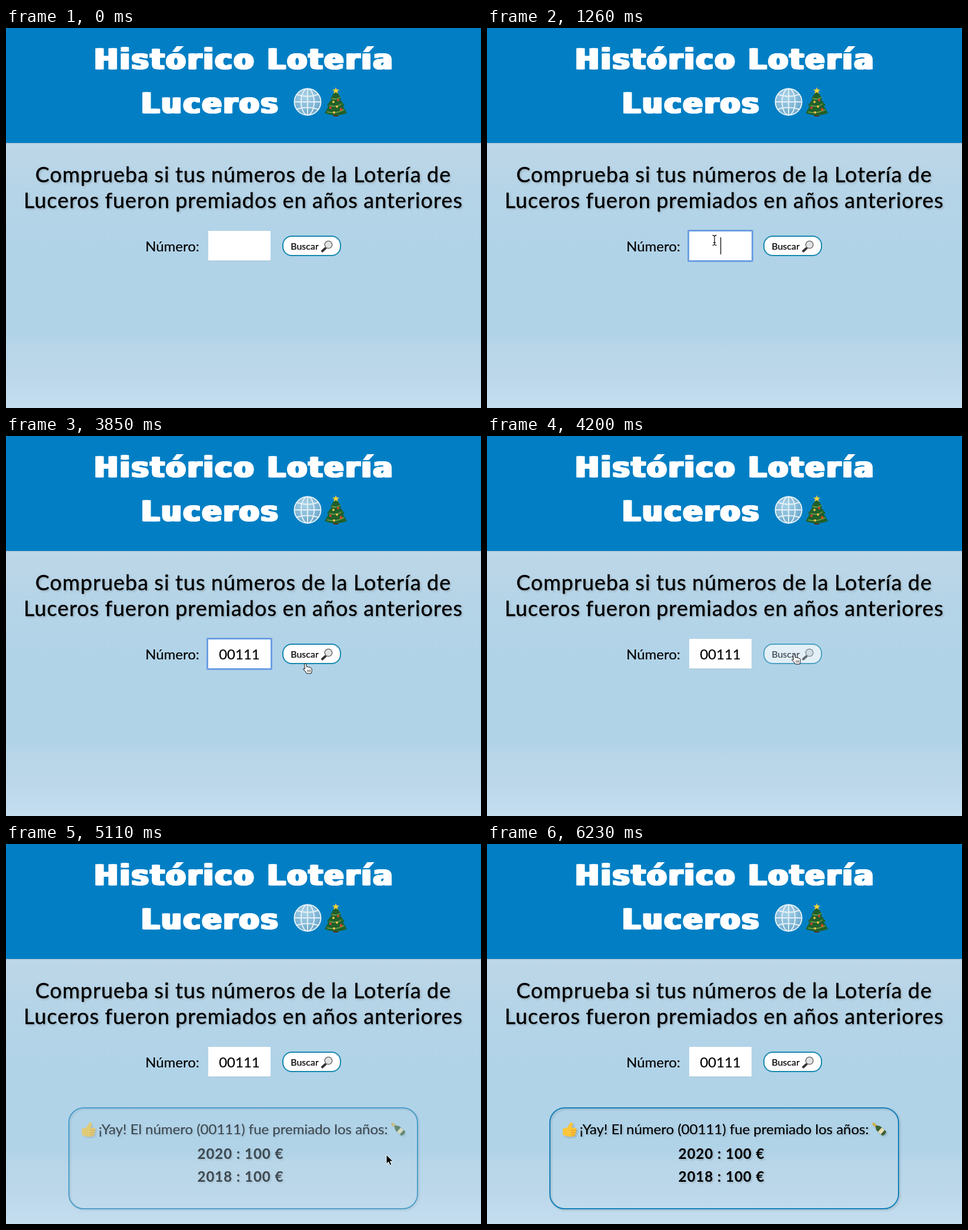
Recreate the animation shown at these times as an HTML page. Size 808 by 648 pixels, loop 6370 ms.

```html
<!DOCTYPE html>
<html lang="es">
<head>
<meta charset="utf-8">
<title>Histórico Lotería Luceros</title>
<style>
  html, body { margin: 0; width: 100%; height: 100%; overflow: hidden; }
  svg { display: block; width: 808px; height: 648px; }
  text { font: 24px Lato, sans-serif; text-anchor: middle; white-space: pre; stroke: #000; stroke-width: .2px; }
  .title text { font: bold 48px "DejaVu Sans", sans-serif; letter-spacing: 3.5px; fill: #fff; stroke: #fff; stroke-width: 1px; }
  .lead { font-size: 36px; letter-spacing: 1px; word-spacing: -.8px; stroke-width: .45px; }
  .prize { font-weight: bold; letter-spacing: 1px; }
  .shadow { filter: drop-shadow(2px 2px 1.5px rgba(0, 0, 0, .16)); }
</style>
</head>
<body>
<svg viewBox="0 0 808 648">
  <defs>
    <linearGradient id="sky" x2="0" y2="1">
      <stop offset="0" stop-color="#bdd7e7"/>
      <stop offset=".2" stop-color="#b5d4e7"/>
      <stop offset=".45" stop-color="#b0d3e8"/>
      <stop offset=".73" stop-color="#b1d3e8"/>
      <stop offset=".77" stop-color="#b8d6e8"/>
      <stop offset=".89" stop-color="#bcd8ea"/>
      <stop offset="1" stop-color="#c4def0"/>
    </linearGradient>
    <radialGradient id="ball" cx=".4" cy=".3" r=".75">
      <stop offset="0" stop-color="#a9d3e8"/>
      <stop offset="1" stop-color="#68a5cb"/>
    </radialGradient>
  </defs>

  <rect y="196" width="808" height="452" fill="url(#sky)"/>
  <rect y="196" width="808" height="1" fill="#a9bfcc"/>
  <rect width="808" height="196" fill="#027fc4"/>

  <g class="title">
    <g id="heading">
      <text x="405.500" y="70">Histórico Lotería</text>
      <text x="348" y="145">Luceros</text>
    </g>
    <use href="#heading" x="-2.200"/>
    <use href="#heading" x="2.200"/>
  </g>

  <g fill="none" stroke="#e4f0f6" stroke-width="2">
    <circle cx="513" cy="126" r="22.500" fill="url(#ball)"/>
    <ellipse cx="513" cy="126" rx="11" ry="22.500"/>
    <path d="M513 103v46M490 126h46M494 113q19 7 38 0M494 139q19-7 38 0"/>
  </g>

  <g>
    <path d="M557 139h8v12h-8z" fill="#5c321c"/>
    <path d="M561 106l9 14-2 1 8 11-3 1 7 12q-19 8-38 0l7-12-3-1 8-11-2-1z" fill="#20602b"/>
    <path d="M554 120q8 3 15-2M550 132q12 4 21-3M546 143q16 4 29-4" fill="none" stroke="#78a548" stroke-width="1.500"/>
    <path d="M561 101l1.500 4 4.500 0-3.500 3 1.500 4-4-2.500-4 2.500 1.500-4-3.500-3 4.500 0z" fill="#f8cf3e"/>
    <g fill="#d8442e">
      <circle cx="565" cy="123" r="2"/><circle cx="552" cy="136" r="2"/><circle cx="570" cy="139" r="2.300"/>
    </g>
    <g fill="#f0c14b">
      <circle cx="557" cy="126" r="2"/><circle cx="563" cy="134" r="2"/><circle cx="558" cy="144" r="2"/>
    </g>
  </g>

  <g class="shadow">
    <text class="lead" x="403.500" y="263">Comprueba si tus números de la Lotería de</text>
    <text class="lead" x="403.500" y="307">Luceros fueron premiados en años anteriores</text>
  </g>

  <text x="283" y="381">Número:</text>
  <rect x="344" y="346.500" width="106" height="51" fill="#a5bdcb"/>
  <rect x="344" y="346" width="106" height="50.500" fill="#fff"/>
  <rect id="ring" x="342.500" y="345.500" width="109" height="52" rx="1" fill="#fff" stroke="#6d9fe2" stroke-width="3"/>
  <text id="value" x="397" y="381"></text>
  <rect id="caret" y="357" width="1.200" height="29"/>

  <g id="button">
    <rect x="471" y="355" width="98" height="33" rx="15" fill="#fff" stroke="#1788b0" stroke-width="2"/>
    <text x="508" y="378" style="font-size:16px">Buscar</text>
    <path d="M538 380.500l5.500-5" stroke="#333" stroke-width="4" stroke-linecap="round"/>
    <circle cx="548.500" cy="369.500" r="6.300" fill="#dfe4e6" stroke="#77706c" stroke-width="1.600"/>
  </g>

  <g id="result" class="shadow">
    <rect x="107" y="450" width="593" height="172" rx="25" fill="none" stroke="#1580b8" stroke-width="2"/>
    <text x="403.500" y="495">¡Yay! El número (00111) fue premiado los años:</text>
    <text class="prize" x="399" y="537">2020 : 100 €</text>
    <text class="prize" x="399" y="576">2018 : 100 €</text>
    <path d="M129 485l7-1 6-9q4-1 4 3l-2 6h7q2 1 1 4l-2 8q-1 3-5 3h-8l-8-3z" fill="#fbc63b"/>
    <path d="M143 488h9M143 492h8M143 496h7" stroke="#d08f20"/>
    <g transform="translate(656 476) rotate(-48) scale(.8 .92)">
      <path d="M-2 1h4v8q4 3 4 7v13q-6 3-12 0V16q0-4 4-7z" fill="#3c6233"/>
      <path d="M-2.500 0h5v8h-5z" fill="#d3b24c"/>
      <path d="M-6 18H6v7H-6z" fill="#eadfb4"/>
    </g>
  </g>

  <g id="arrow" stroke="#fff" stroke-linejoin="round">
    <path d="M0 0v15.500l3.600-3.400 2.500 5.700 2.800-1.200-2.500-5.500h5z"/>
  </g>
  <g id="beam" fill="none" stroke="#222" stroke-width="1.300">
    <path d="M-3.500-8.500Q0-8.500 0-6 0-8.500 3.500-8.500M0-7V7M-3.500 8.500Q0 8.500 0 6 0 8.500 3.500 8.500M-2 4H2"/>
  </g>
  <g id="hand" fill="#fff" stroke="#111" stroke-linejoin="round">
    <path d="M-1.500 1Q0-1 1.500 1l1 5q2-1.500 3 .5 2-1 3 .8 2-.6 2.500 1.500 1 4-1 8.200H2.500Q0 12-3 10.500-4 8.500-2 8.500l1.500 1z"/>
    <path d="M4 10.500v4M6.200 10.500v4M8.400 10.500v4" stroke-width=".8"/>
  </g>
</svg>
<script>
const LOOP = 6370, STEP = 70;
const NUMBER = "00111", KEY_TIMES = [1470, 1680, 2380, 2660, 3010];
const DIGIT = 13.92;
const FOCUS = 910, HIDE = 2100, MOVE = 3500, CLICK = 4200;

// Pointer paths: [time, x, y]
const ARRIVE = [[70, 470, 655], [840, 387, 362], [HIDE, 387, 362]];
const LEAVE = [[MOVE, 387, 362], [3850, 509, 388], [4060, 522, 372], [4270, 522, 372],
  [4620, 612, 422], [5110, 647, 530], [5600, 690, 655]];

const el = id => document.getElementById(id);
const clamp = v => Math.min(1, Math.max(0, v));
const show = (id, on) => el(id).style.display = on ? "" : "none";
const inside = ([x, y], l, t, r, b) => x >= l && x <= r && y >= t && y <= b;

function along(path, t) {
  const i = path.findIndex(p => p[0] > t);
  if (i < 1) return null;
  const [a, b] = [path[i - 1], path[i]];
  const k = (t - a[0]) / (b[0] - a[0]);
  return [a[1] + (b[1] - a[1]) * k, a[2] + (b[2] - a[2]) * k];
}

function drawPointer(t) {
  const pos = along(t < HIDE ? ARRIVE : LEAVE, t);
  const kind = !pos ? "" :
    inside(pos, 344, 346, 450, 397) ? "beam" :
    inside(pos, 470, 354, 570, 389) ? "hand" : "arrow";
  for (const id of ["arrow", "beam", "hand"]) {
    show(id, id === kind);
    if (id === kind) el(id).setAttribute("transform", `translate(${pos})`);
  }
}

function draw(t) {
  const typed = KEY_TIMES.filter(k => t >= k).length;
  el("value").textContent = NUMBER.slice(0, typed);
  el("caret").setAttribute("x", 397 + typed * DIGIT / 2);
  show("caret", t >= FOCUS && t < MOVE && !(t >= HIDE && t < KEY_TIMES[2]));
  show("ring", t >= FOCUS && t < CLICK);
  el("button").style.opacity = t < CLICK ? 1 : .65 + .35 * clamp((t - 4620) / 350);
  el("result").style.opacity = clamp((t - CLICK) / 1400);
  drawPointer(t);
}

function tick() {
  const t = performance.now() % LOOP;
  draw(Math.floor(t / STEP) * STEP);
  requestAnimationFrame(tick);
}
tick();
</script>
</body>
</html>
```
